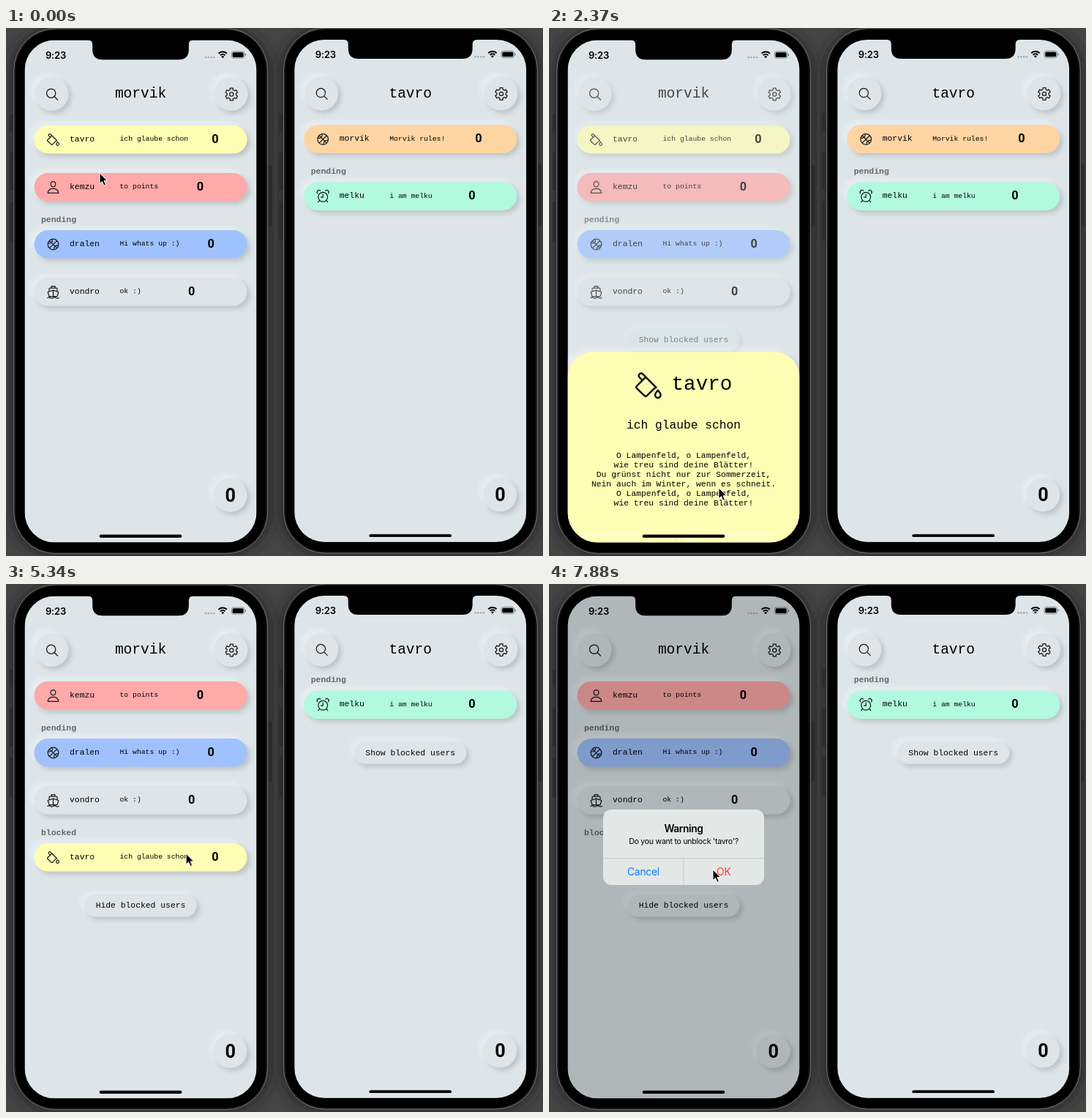
Animation, 734 px wide and 721 px high, one loop 8000 ms. Source, as an HTML page:

```html
<!DOCTYPE html>
<html lang="en">
<head>
<meta charset="utf-8">
<title>Contacts demo</title>
<style>
  html, body { margin: 0; width: 100%; height: 100%; overflow: hidden; background: #454545; }
  svg { display: block; }
  text { white-space: pre; }
  .mono { font-family: "Liberation Mono", "Courier New", monospace; }
  .sans { font-family: Inter, Roboto, sans-serif; }
  .digit { font-family: Roboto, Inter, sans-serif; font-weight: 700; }
  .icon { fill: none; stroke: #16191a; stroke-width: 32; stroke-linecap: round; stroke-linejoin: round; }
  .neo { filter: url(#neo); }
  .pop { transform-box: fill-box; transform-origin: center; }
</style>
</head>
<body>
<svg id="stage" width="734" height="721" viewBox="0 0 734 721"></svg>
<script>
const BG = '#dde5e8', YELLOW = '#fefeb4', PINK = '#ffa9a9', BLUE = '#9fc2ff', ORANGE = '#ffd4a3', MINT = '#b2fadf';
const ME = 'morvik', FRIEND = 'tavro', MOTTO = 'ich glaube schon';
const LEFT = 25.5, WIDTH = 317, TOP = 16.5, HEIGHT = 686, MID = LEFT + WIDTH / 2;
const SCALE = 317 / 390;
const PT = n => n * SCALE;

// Icon outlines on a 512 unit grid.
const ring = (x, y, r) => `M${x - r} ${y}a${r} ${r} 0 1 0 ${2 * r} 0a${r} ${r} 0 1 0${-2 * r} 0`;

function gear() {
  let d = '';
  for (let k = 0; k < 24; k++) {
    const tooth = k % 4 === 1 || k % 4 === 2;
    const a = (Math.floor(k / 4) * 60 + 90 + (k % 4 < 2 ? -1 : 1) * (tooth ? 13 : 19)) * Math.PI / 180;
    const r = tooth ? 214 : 158;
    d += `${k ? 'L' : 'M'}${(256 + r * Math.cos(a)).toFixed()} ${(256 + r * Math.sin(a)).toFixed()}`;
  }
  return d + 'Z' + ring(256, 256, 64);
}

const ICONS = {
  bucket: 'M416 336c-12 14-48 48-48 79a48 49 0 0 0 96 0c0-31-36-65-48-79ZM387 288L156 58a36 36 0 0 0-51 0l-5 5' +
    'a36 36 0 0 0 0 51l53 53M209 111L56 263a28 28 0 0 0 0 40l132 126a28 28 0 0 0 39 0L354 306c8-7 20-7 33-18Z',
  person: 'M344 144c-4 53-44 96-88 96s-84-43-88-96c-4-55 35-96 88-96s92 42 88 96Z' +
    'M256 304c-87 0-175 48-192 139c-2 11 4 21 16 21h352c12 0 18-10 16-21c-17-91-105-139-192-139Z',
  ball: ring(256, 256, 192) + 'M120 120L392 392M392 120L120 392M224 66q36 150-158 158M288 446q-36-150 158-158',
  boat: 'M64 256l192-64 192 64-48 160H112ZM112 236V144a32 32 0 0 1 32-32h224a32 32 0 0 1 32 32v92' +
    'M192 108V52h128v56M256 192v216M56 464q50-36 100 0t100 0t100 0t100 0',
  alarm: ring(256, 280, 168) + 'M256 184v104h-72M60 150a72 72 0 0 1 106-96M452 150a72 72 0 0 0-106-96M132 408l-44 48M380 408l44 48',
  search: ring(221, 221, 157) + 'M338 338L448 448',
  chat: 'M408 64H104a56 56 0 0 0-56 56v192a56 56 0 0 0 56 56h40v80l96-80h168a56 56 0 0 0 56-56V120a56 56 0 0 0-56-56Z',
  block: ring(256, 256, 192) + 'M320 320L192 192M192 320L320 192',
  gear: gear()
};

// Drawing helpers; y is the middle of texts and icons.
const group = (id, body, more = '') => `<g id="${id}" ${more}>${body}</g>`;
const rect = (x, y, w, h, r, fill, more = '') =>
  `<rect x="${x}" y="${y}" width="${w}" height="${h}" rx="${r}" fill="${fill}" ${more}/>`;
const mono = (x, y, pt, str, more = '') =>
  `<text class="mono" x="${x}" y="${y + PT(pt) * .266}" font-size="${PT(pt)}" ${more}>${str}</text>`;
const centred = (y, pt, str) => mono(MID, y, pt, str, 'text-anchor="middle"');
const sans = (x, y, pt, str, more = '', kind = 'sans') =>
  `<text class="${kind}" x="${x}" y="${y + PT(pt) * .36}" font-size="${PT(pt)}" text-anchor="middle" ${more}>${str}</text>`;
const digit = (x, y, pt) => sans(x, y, pt, '0', '', 'digit');
const icon = (name, x, y, size) =>
  `<path class="icon" d="${ICONS[name]}" transform="translate(${x} ${y}) scale(${size / 512}) translate(-256 -256)"/>`;
const disc = (x, y) => `<circle class="neo" cx="${x}" cy="${y}" r="23" fill="${BG}"/>`;
const capsule = (x, y, w, h, fill) => rect(x, y - h / 2, w, h, h / 2, fill, 'class="neo"');

const header = name =>
  disc(62.5, 90) + icon('search', 63, 90.5, 20) +
  centred(90, 24, name) +
  disc(307.5, 90) + icon('gear', 308.3, 90.5, 20.5);
const points = () => disc(306.5, 638) + digit(306.7, 637.7, 31);

// Stacks rows, section labels and the closing button downwards.
function column(y) {
  return {
    row(id, color, pic, name, motto) {
      y += 65;
      return group(id, capsule(38.5, y, 291, 38.6, color) + icon(pic, 64.5, y + .2, 19.5) +
        mono(87, y - .6, 14, name) + mono(155.5, y - .4, 12, motto) +
        digit(238.8 + 2.95 * motto.length, y - 1.2, 20), 'class="pop"');
    },
    label(str) {
      y += 13;
      return mono(48, y + 31.7, 14.1, str, 'font-weight="700" fill="#63686a"');
    },
    pill(id, str) {
      return group(id, capsule(107, y + 66, 153.5, 30, BG) + centred(y + 66, 14, str), 'class="pop"');
    }
  };
}

function statusBar() {
  let s = sans(68, 37, 16, '9:23', 'font-weight="600" letter-spacing="-.2"');
  for (let i = 0; i < 4; i++) s += `<circle cx="${272.8 + i * 3.8}" cy="40" r="1.3" fill="#a5abae"/>`;
  s += '<path d="M290.500 34.800a8.500 8.500 0 0 1 11.400 0M292.800 37.300a5 5 0 0 1 6.800 0" fill="none" stroke="#000" stroke-width="2"/>' +
       '<path d="M294.200 39a3 3 0 0 1 4 0L296.200 41.300Z"/>';
  return s + rect(308.3, 32, 17.6, 9.2, 2.8, 'none', 'stroke="#6f7476" stroke-width=".8"') +
    rect(309.6, 33.3, 15, 6.6, 1.6, '#000') + rect(326.8, 35, 1.2, 3.2, .6, '#6f7476');
}

function phone(dx, dy, screen, notchWidth, notchHeight) {
  const w = PT(notchWidth), inner = w - 28;
  const notch = `<path d="M${MID - w / 2 - 6} 14v2.500q6 0 6 6V${TOP + PT(notchHeight) - 14}q0 14 14 14` +
    `h${inner}q14 0 14-14V22.500q0-6 6-6V14Z"/>`;
  const button = (x, y, h) => rect(x, y, 6, h, 1.5, '#2b2b2b');
  return `<g transform="translate(${dx} ${dy})">` +
    rect(8, 2, 352, 717, 58, '#222', 'filter="url(#halo)"') +
    button(5, 117, 24) + button(5, 170, 52) + button(5, 237, 54) + button(357, 187, 83) +
    rect(10.7, .8, 347, 717, 57, '#161616', 'stroke="#777"') +
    rect(13.5, 3, 341.5, 712.5, 54, '#000') +
    group('', rect(LEFT, TOP, WIDTH, HEIGHT, 0, BG) + screen, 'clip-path="url(#screen)"') +
    notch + rect(MID - 56.3, 691.8, 112.6, 4.2, 2.1, '#000') + '</g>';
}

function sheet() {
  const verse = ['O Lampenfeld, o Lampenfeld,', 'wie treu sind deine Blätter!',
    'Du grünst nicht nur zur Sommerzeit,', 'Nein auch im Winter, wenn es schneit.'];
  const lines = [...verse, ...verse.slice(0, 2)].map((line, i) => centred(535.5 + i * 13, 14, line));
  const button = (x, pic, str, inset) => capsule(x, 664.5, 133.5, 35, YELLOW) +
    icon(pic, x + inset, 664.5, 20.5) + mono(x + inset + 16, 664, 18, str);
  return group('sheet',
    rect(LEFT, 394, WIDTH, 400, 34, YELLOW, 'class="neo"') +
    icon('bucket', 136, 440, 41) + mono(167.5, 438.5, 34, FRIEND) +
    centred(494, 20, MOTTO) + lines.join('') +
    button(44, 'chat', 'Chat', 46) + button(191, 'block', 'Block', 40.5));
}

function alertBox() {
  return group('alert',
    rect(74, 308, 220, 103, 11.5, '#e3e7e6') +
    rect(74, 374, 220, .8, 0, '#bcc0c0') + rect(183.6, 374, .8, 37, 0, '#bcc0c0') +
    sans(MID, 334, 17, 'Warning', 'font-weight="600" letter-spacing="-.4"') +
    sans(MID, 351.5, 13, `Do you want to unblock '${FRIEND}'?`, 'letter-spacing="-.25"') +
    sans(129, 393.3, 17, 'Cancel', 'fill="#0a7aff" letter-spacing="-.2"') +
    sans(238.8, 393.3, 17, 'OK', 'fill="#ff3b30" letter-spacing="-.2"'), 'class="pop"');
}

const FIRST = 87.3;
const contacts = column(FIRST), blocked = column(FIRST + 3 * 65 + 13), others = column(FIRST);

const leftScreen =
  group('main',
    header(ME) +
    contacts.row('friend', YELLOW, 'bucket', FRIEND, MOTTO) +
    group('rest',
      group('list',
        contacts.row('second', PINK, 'person', 'kemzu', 'to points') +
        contacts.label('pending') +
        contacts.row('third', BLUE, 'ball', 'dralen', 'Hi whats up :)') +
        contacts.row('fourth', BG, 'boat', 'vondro', 'ok :)')) +
      contacts.pill('show', 'Show blocked users')) +
    group('blocked',
      blocked.label('blocked') +
      blocked.row('blockedFriend', YELLOW, 'bucket', FRIEND, MOTTO) +
      blocked.pill('hide', 'Hide blocked users')) +
    points()) +
  statusBar() + sheet() +
  rect(LEFT, TOP, WIDTH, HEIGHT, 0, '#000', 'id="shade"') + alertBox();

const rightScreen =
  header(FRIEND) +
  others.row('me', ORANGE, 'ball', ME, 'Morvik rules!') +
  group('rest2',
    others.label('pending') +
    others.row('waiting', MINT, 'alarm', 'melku', 'i am melku') +
    others.pill('show2', 'Show blocked users')) +
  points() + statusBar();

const shadow = (shift, color, alpha, name) =>
  `<feOffset in="soft" dx="${shift}" dy="${shift}" result="moved"/>
   <feFlood flood-color="${color}" flood-opacity="${alpha}"/>
   <feComposite in2="moved" operator="in" result="${name}"/>`;

document.getElementById('stage').innerHTML = `
  <defs>
    <clipPath id="screen">${rect(LEFT, TOP, WIDTH, HEIGHT, 41, '#000')}</clipPath>
    <filter id="neo" x="-.5" y="-.8" width="2" height="2.6" color-interpolation-filters="sRGB">
      <feGaussianBlur in="SourceAlpha" stdDeviation="3" result="soft"/>
      ${shadow(-6.5, '#fff', .32, 'light')} ${shadow(4, '#000', .14, 'dark')}
      <feMerge><feMergeNode in="light"/><feMergeNode in="dark"/><feMergeNode in="SourceGraphic"/></feMerge>
    </filter>
    <filter id="halo"><feGaussianBlur stdDeviation="9"/></filter>
  </defs>` +
  rect(0, 0, 734, 721, 0, '#454545') +
  phone(0, 0, leftScreen, 162, 33) +
  phone(368.7, -.6, rightScreen, 209, 32) +
  group('cursor', `<path d="M0 0V14.800L3.400 11.600L5.900 17.300L8.400 16.200L6 10.600H10.600Z"
    stroke="#fff" stroke-linejoin="round"/>`);

// Motion: smooth functions of time, shown at a low, steady frame rate.
const LOOP = 8000, TICK = 148.5, LEAD = 18;

const ramp = (t, from, to) => Math.min(1, Math.max(0, (t - from) / (to - from)));
const smooth = u => u * u * (3 - 2 * u);
const easeIn = u => u * u;
const easeOut = u => 1 - (1 - u) ** 2;
const bump = u => Math.sin(Math.PI * u);

function play(id, pose) {
  const frames = [];
  for (let n = 0; n * TICK < LOOP; n++) {
    frames.push({ offset: Math.max(0, n * TICK - LEAD) / LOOP, easing: 'step-end', ...pose(n * TICK) });
  }
  frames.push({ ...frames[frames.length - 1], offset: 1 });
  document.getElementById(id).animate(frames, { duration: LOOP, iterations: Infinity });
}

const open = t => easeOut(ramp(t, 330, 740)) - easeIn(ramp(t, 2200, 2660));
const press = t => bump(ramp(t, 150, 890));
const removed = t => smooth(ramp(t, 2400, 2660));
const toggled = t => smooth(ramp(t, 4430, 4880));
const toggling = t => bump(ramp(t, 4360, 4900));
const warned = t => easeOut(ramp(t, 6600, 6830));
const lift = t => ({ transform: `translate(0px, ${-65 * removed(t)}px)` });

// Places where the pointer starts, turns or rests: time, x, y.
const STOPS = [
  [0, 128, 198], [350, 152, 158], [740, 202, 172], [1170, 227, 667], [1480, 229, 636], [1800, 229, 636],
  [1920, 232, 628], [3740, 232, 628], [4400, 132, 364], [4910, 132, 364], [5490, 267, 369],
  [6900, 105, 387], [7010, 105, 387], [7430, 224, 390], [LOOP, 224, 390]
];

function pointer(t) {
  const i = STOPS.findIndex(([time]) => time > t);
  const [t0, x0, y0] = STOPS[i - 1], [t1, x1, y1] = STOPS[i];
  const u = smooth(ramp(t, t0, t1));
  const away = t > 6380 && t < 7100;
  return { opacity: away ? 0 : 1, transform: `translate(${x0 + (x1 - x0) * u}px, ${y0 + (y1 - y0) * u}px)` };
}

play('cursor', t => t < 5490 || t > 6380 ? pointer(t) : pointer(5489));
play('sheet', t => ({ transform: `translate(0px, ${330 * (1 - open(t))}px)` }));
play('main', t => ({ opacity: 1 - .345 * open(t) }));
play('friend', t => ({ opacity: (1 - .13 * press(t)) * (1 - removed(t)), transform: `scale(${1 - .023 * press(t)})` }));
play('rest', lift);
play('rest2', lift);
play('me', t => ({ opacity: 1 - removed(t) }));
play('show', t => ({ opacity: ramp(t, 2130, 2530) * (1 - toggled(t)), transform: `scale(${1 - .025 * toggling(t)})` }));
play('show2', t => ({ opacity: removed(t) }));
play('list', t => ({ opacity: 1 - .18 * toggling(t) }));
play('blocked', t => ({ opacity: toggled(t) }));
play('blockedFriend', t => ({ opacity: 1 - ramp(t, 6140, 6380) }));
play('shade', t => ({ opacity: .2 * warned(t) }));
play('alert', t => ({ opacity: warned(t), transform: `scale(${1.15 - .15 * warned(t)})` }));
</script>
</body>
</html>
```
